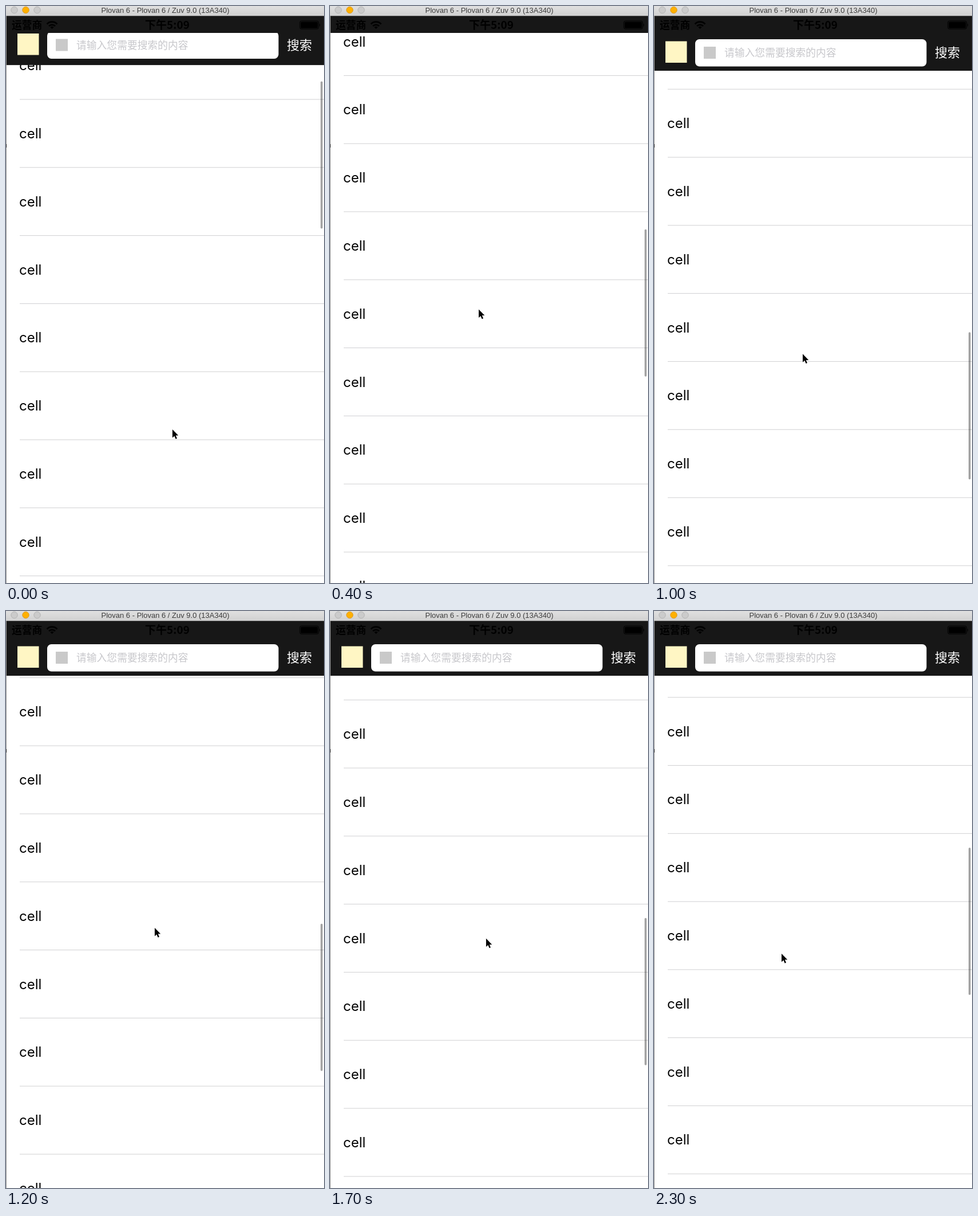
An HTML page for the animation above (2.4 s loop, 556x1007 px).

```html
<!DOCTYPE html>
<html lang="zh">
<head>
<meta charset="utf-8">
<title>Scrolling list</title>
<style>
  html, body { margin: 0; width: 100%; height: 100%; overflow: hidden; background: #fff; }
  svg { display: block; width: 100%; height: 100%; }
  text { font-family: "Noto Sans CJK SC", "Noto Sans CJK", sans-serif; }
  .cell { font: 24px Inter, sans-serif; }
  .title { font: 13px "Liberation Sans", sans-serif; fill: #3c3c3c; text-anchor: middle; }
  .status { font-weight: 700; }
</style>
</head>
<body>
<svg viewBox="0 0 556 1007" preserveAspectRatio="none">
  <defs>
    <linearGradient id="chrome" x2="0" y2="1">
      <stop stop-color="#e0e0e0"/><stop offset="1" stop-color="#d0d0d0"/>
    </linearGradient>
    <clipPath id="barClip"><rect id="clipRect" y="47" width="556" height="66"/></clipPath>
  </defs>
  <rect width="556" height="1007" fill="#fff"/>
  <g id="list"></g>
  <rect id="thumb" x="550" width="3.6" height="257" rx="1.8" fill="#000" opacity=".36"/>

  <rect id="bar" y="17" width="556" height="96" fill="#171717"/>
  <g clip-path="url(#barClip)">
    <g id="items">
      <rect x="20" y="61.5" width="37.5" height="37.5" fill="#fff6c4"/>
      <rect x="72" y="58" width="404.5" height="47.5" rx="7.5" fill="#fff"/>
      <rect x="87" y="71" width="21" height="21" fill="#c9c9c9"/>
      <text x="123" y="88" font-size="17.8" fill="#c7c7cb">请输入您需要搜索的内容</text>
      <text x="491" y="89" font-size="22" fill="#fff">搜索</text>
    </g>
  </g>

  <g class="status">
    <text x="10" y="39.5" font-size="17.8">运营商</text>
    <text x="282" y="39.5" font-size="19" text-anchor="middle">下午5:09</text>
    <g fill="none" stroke="#000" stroke-width="2.6">
      <path d="M71.5 31.5a12.5 12.5 0 0 1 18 0M75 35a7.8 7.8 0 0 1 11 0"/>
    </g>
    <path d="M77.5 37a4.2 4.2 0 0 1 6 0l-3 3z"/>
    <rect x="513.7" y="26.2" width="33" height="14" rx="3" fill="none" stroke="#000"/>
    <rect x="515.2" y="27.7" width="30" height="11" rx="1.5"/>
    <path d="M548 30.5q2.2 2.7 0 5.4z"/>
  </g>

  <rect width="556" height="17.3" fill="url(#chrome)"/>
  <g stroke-width="1">
    <circle cx="14.5" cy="7" r="5.7" fill="#cbcbcb" stroke="#b3b3b3"/>
    <circle cx="34.5" cy="7" r="5.7" fill="#ffb000" stroke="#dc981c"/>
    <circle cx="54.5" cy="7" r="5.7" fill="#cbcbcb" stroke="#b3b3b3"/>
  </g>
  <text class="title" x="278.5" y="11.7">Plovan 6 - Plovan 6 / Zuv 9.0 (13A340)</text>
  <rect y="17" width="1" height="990" fill="#999"/>
  <rect y="241" width="1" height="6" fill="#222"/>

  <path id="cursor" d="M0 0V14.5L3.4 11.4L5.7 16.8L8 15.8L5.8 10.6H10.3Z"
        stroke="#fff" stroke-width="1.4" paint-order="stroke"/>
</svg>
<script>
const LOOP = 2400, STEP = 100, ROW = 118.8;

// time, scroll, pointer x, pointer y
const poses = [
  [0, 0, 291, 739],
  [400, 992, 260, 529.5],
  [800, 1771, 260, 636],
  [1200, 1591, 260, 553],
  [1400, 1947.5, 266, 486],
  [1900, 1262, 275, 618],
  [2300, 1081.5, 223, 598]
];
// start time, how far the navigation bar is hidden
const barStates = [
  [0, .15], [100, 1], [900, .4], [1000, 0],
  [1300, .6], [1400, 1], [1500, .4], [1600, 0]
];

const el = id => document.getElementById(id);
const list = el('list');
for (let i = -1; i < 10; i++) {
  const y = i * ROW;
  list.insertAdjacentHTML('beforeend',
    `<rect x="24" y="${y - .5}" width="532" height="1" fill="#d0d0d2"/>
     <text class="cell" x="23" y="${y + 68}">cell</text>`);
}

const rate = (i, col) =>
  (poses[i + 1][col] - poses[i][col]) / (poses[i + 1][0] - poses[i][0]);

// Monotone slope: flat at turning points, harmonic mean elsewhere
function slope(i, col) {
  if (i === 0) return rate(0, col);
  if (i === poses.length - 1) return 0;
  const a = rate(i - 1, col), b = rate(i, col);
  return a * b > 0 ? 2 * a * b / (a + b) : 0;
}

function valueAt(t, col) {
  let i = 0;
  while (i < poses.length - 2 && t >= poses[i + 1][0]) i++;
  const p = poses[i], q = poses[i + 1], span = q[0] - p[0];
  const u = (t - p[0]) / span, v = 1 - u;
  return p[col] * v * v * (1 + 2 * u) + q[col] * u * u * (3 - 2 * u)
    + span * u * v * (slope(i, col) * v - slope(i + 1, col) * u);
}

const move = (id, x, y) => el(id).setAttribute('transform', `translate(${x} ${y})`);

function draw(t) {
  const scroll = valueAt(t, 1);
  const hidden = barStates.filter(s => s[0] <= t).pop()[1];
  const offset = (((163 - scroll) % ROW) + ROW) % ROW;
  move('list', 0, offset);
  el('thumb').setAttribute('y', 131.5 + scroll * .2604);
  el('bar').setAttribute('height', 96 - 66 * hidden);
  el('clipRect').setAttribute('height', 66 * (1 - hidden));
  move('items', 0, -90 * hidden);
  move('cursor', valueAt(t, 2), valueAt(t, 3));
}

const start = performance.now();
function tick() {
  const t = (performance.now() - start) % LOOP;
  draw(Math.floor(t / STEP) * STEP);
  requestAnimationFrame(tick);
}
tick();
</script>
</body>
</html>
```
